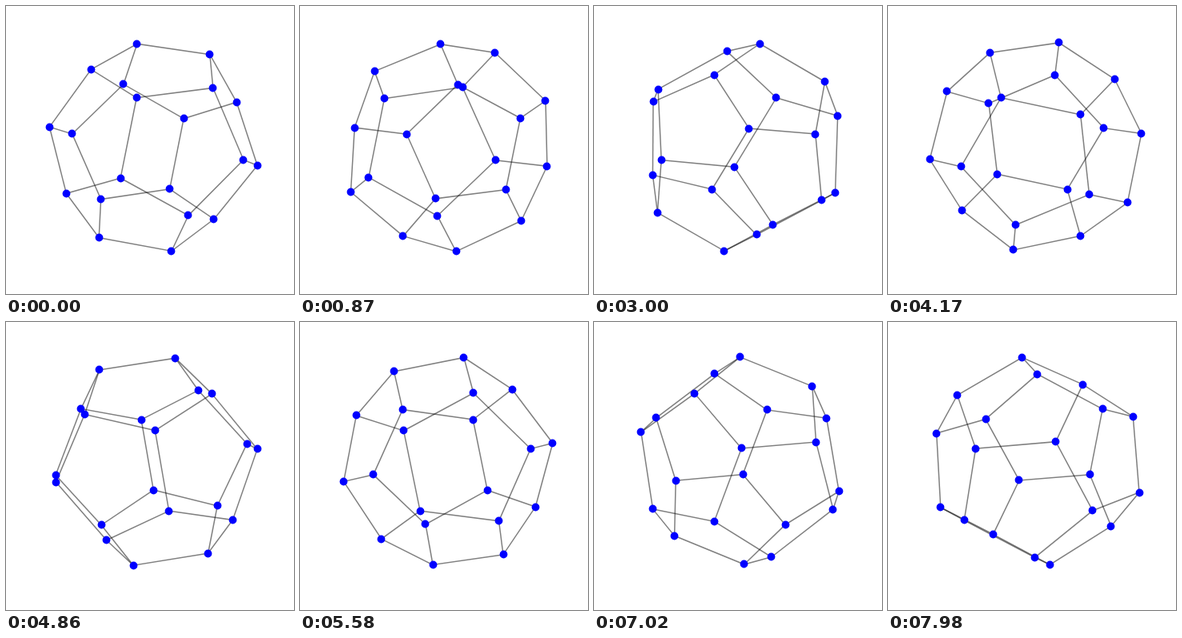
Animation of 360x360 px, one loop 8 s. Source, as an HTML page:

```html
<!DOCTYPE html>
<html lang="en">
<head>
<meta charset="utf-8">
<title>Rotating dodecahedron</title>
<style>
  html, body { margin: 0; width: 100%; height: 100%; overflow: hidden; background: #fff; }
  svg { display: block; width: 100vw; height: 100vh; }
  line { stroke: #000; stroke-width: 1.5; stroke-opacity: .5; stroke-linecap: square; }
  circle { fill: #00f; }
</style>
</head>
<body>
<svg id="stage" viewBox="0 0 360 360"></svg>
<script>
const LOOP = 8000, STEP = 30;          // ms; one degree per step
const CX = 185.25, CY = 175.45, EYE = 1850;

// Upper half of the solid as [x, y, depth]; the rest mirrors through the centre.
const half = [
  [-21.5, -129.5, 18.8], [69.3, -114.5, -6.5], [-76.7, -93.5, -50.7],
  [-129.9, -24, -13.7], [106.3, -57, 59.4], [69.9, -69.4, -91.4],
  [-40.4, -81.8, 99.1], [-20.6, -56.8, -119.1], [39.3, -37, 124.2],
  [-106.9, -16.2, 78.7]
];
const nodes = half.concat(half.map(p => p.map(c => -c)));

const edges = [];
nodes.forEach((a, i) => {
  for (let j = i + 1; j < nodes.length; j++) {
    const b = nodes[j];
    if (Math.hypot(a[0] - b[0], a[1] - b[1], a[2] - b[2]) < 125) edges.push([i, j]);
  }
});

const stage = document.getElementById('stage');
function add(tag, attrs = {}) {
  const el = document.createElementNS('http://www.w3.org/2000/svg', tag);
  set(el, attrs);
  return stage.appendChild(el);
}
function set(el, attrs) {
  for (const key in attrs) el.setAttribute(key, attrs[key]);
}

const lines = edges.map(() => add('line'));
const dots = nodes.map(() => add('circle', { r: 4.9 }));

function project([x, y, z], angle) {
  const c = Math.cos(angle), s = Math.sin(angle);
  const scale = EYE / (EYE + z * c - x * s);
  return [CX + (x * c + z * s) * scale, CY + y * scale];
}

const snap = v => Math.floor(v) + 0.5;

function draw(ms) {
  const angle = Math.floor((ms % LOOP) / STEP) * Math.PI / 180;
  const pts = nodes.map(p => project(p, angle));
  edges.forEach(([i, j], k) => set(lines[k], {
    x1: pts[i][0], y1: pts[i][1], x2: pts[j][0], y2: pts[j][1]
  }));
  pts.forEach(([x, y], i) => set(dots[i], { cx: snap(x), cy: snap(y) }));
}

let start;
function tick(now) {
  if (start === undefined) start = now;
  draw(Math.max(0, now - start));
  requestAnimationFrame(tick);
}
draw(0);
requestAnimationFrame(tick);
</script>
</body>
</html>
```
